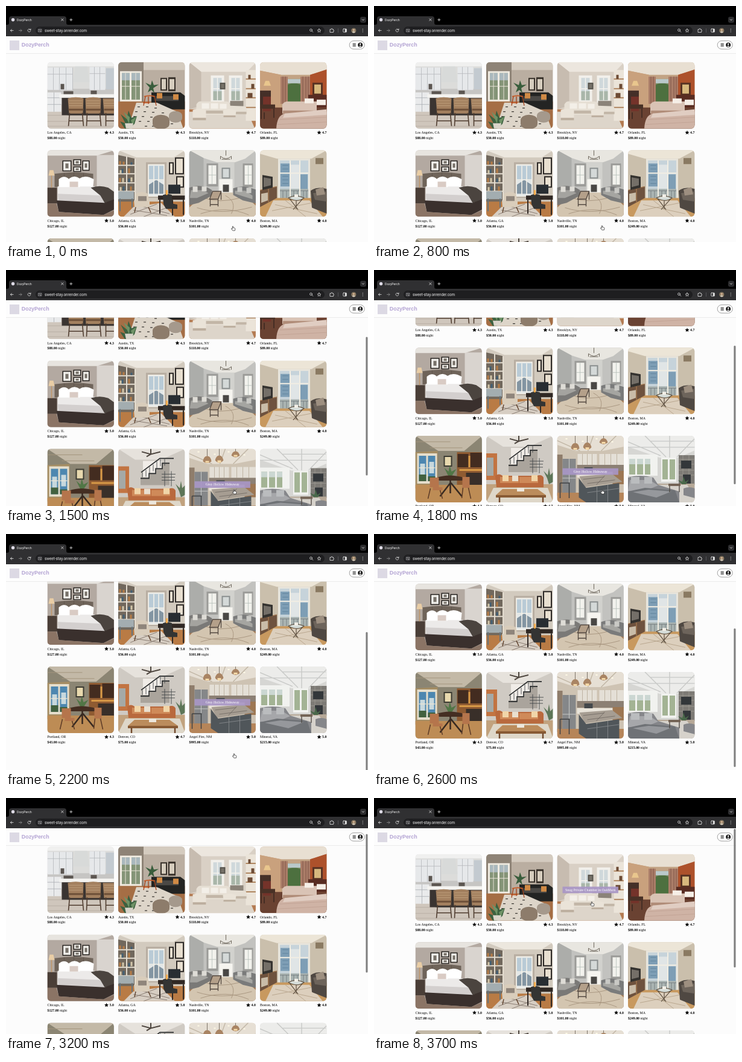
Animation of 600 by 390 pixels, one loop 3800 ms. Source, as an HTML page:

```html
<!DOCTYPE html>
<html lang="en">
<head>
<meta charset="utf-8">
<title>DozyPerch</title>
<style>
  html, body { margin: 0; width: 100%; height: 100%; overflow: hidden; background: #fcfcfc; }
  svg { display: block; }
  text { white-space: pre; }
  .ui { font-family: Roboto, Inter, sans-serif; fill: #ececec; }
  .caption { font: 5.87px "Liberation Serif", "Times New Roman", serif; fill: #000; }
  .bold { font-weight: 700; }
  .brand { font: 700 8.9px "Liberation Sans", Arial, sans-serif; fill: #b3a3d3; }
  .icon { fill: none; stroke: #d6d6d6; stroke-width: .9; stroke-linecap: round; stroke-linejoin: round; }
</style>
</head>
<body>
<svg width="600" height="390" viewBox="0 0 600 390">
  <defs>
    <clipPath id="photo"><rect width="110.4" height="110" rx="6"/></clipPath>
    <clipPath id="page"><rect y="78" width="600" height="312"/></clipPath>
    <path id="star" d="M0-3.5 1-1.1 3.5-1 1.6.6 2.2 3.1 0 1.7-2.2 3.1-1.6.6-3.5-1-1-1.1z"/>
  </defs>

  <rect width="600" height="390" fill="#fcfcfc"/>
  <g clip-path="url(#page)"><g id="grid"></g></g>

  <!-- site header -->
  <path fill="#fdfdfd" d="M0 50h600v28H0z"/>
  <path fill="#e6e6e6" d="M0 78h600v.8H0z"/>
  <rect x="6" y="57" width="16" height="16" fill="#dcd9e4"/>
  <text class="brand" x="25.8" y="67.4">DozyPerch</text>
  <rect x="569.2" y="57.6" width="25" height="13.6" rx="6.8" fill="#fff" stroke="#8a8a8a" stroke-width=".8"/>
  <path stroke="#222" stroke-width="1" d="M574.6 62.3h5.2m-5.2 2h5.2m-5.2 2h5.2"/>
  <circle cx="587.2" cy="64.3" r="3.9" fill="#111"/>
  <circle cx="587.2" cy="63.1" r="1.3" fill="#fff"/>
  <path fill="#fff" d="M584.8 66.6q2.4-2.4 4.8 0q-2.4 1.8-4.8 0z"/>

  <!-- browser frame -->
  <path d="M0 0h600v32H0z"/>
  <path fill="#303032" d="M0 31h600v19H0z"/>
  <path fill="#303032" d="M2 31q3 0 3-3v-7q0-4 4-4h87q4 0 4 4v7q0 3 3 3z"/>
  <circle cx="11.6" cy="22.8" r="2.7" fill="#dedbe6"/>
  <text class="ui" x="18" y="24.8" font-size="5.2">DozyPerch</text>
  <path class="icon" d="m91.7 21 3.4 3.4m0-3.4-3.4 3.4M105.8 22.8h4m-2-2v4"/>
  <rect x="587" y="17.8" width="10" height="10" rx="3" fill="#2d2d2f"/>
  <path class="icon" d="m590.2 22 1.7 1.7 1.7-1.7"/>
  <rect x="49" y="34" width="479" height="13" rx="6.5" fill="#1e1e20"/>
  <path class="icon" d="M12 40.5H7.4m2-2-2 2 2 2"/>
  <path class="icon" style="stroke:#858585" d="M21.5 40.5h4.6m-2-2 2 2-2 2"/>
  <path class="icon" d="M40.6 39.2a2.4 2.4 0 1 0 .2 2M41 37.8v1.7h-1.7"/>
  <circle cx="56.2" cy="40.5" r="4.6" fill="#343437"/>
  <path class="icon" d="M53.8 39.2h2m1.6 0h1.2m-4.8 2.7h1m1.6 0h2.2"/>
  <text class="ui" x="64" y="42.7" font-size="6.3">sweet-stay.onrender.com</text>
  <circle class="icon" cx="505.5" cy="39.8" r="1.9"/>
  <path class="icon" d="m507 41.4 1.7 1.7"/>
  <use href="#star" class="icon" transform="translate(519 40.6) scale(.85)"/>
  <path class="icon" d="M537.4 38.6h1.6q0-1.4 1-1.4t1 1.4h1.6v1.5q1 0 1 .9t-1 .9v1.6h-5.2z"/>
  <path stroke="#66666a" stroke-width=".7" d="M550.5 37v7"/>
  <rect class="icon" x="558.8" y="37.8" width="5.6" height="5.4" rx=".6"/>
  <path fill="#e0e0e0" d="M561.8 38h2.5v5h-2.5z"/>
  <circle cx="576.3" cy="40.5" r="4" fill="#8a7a62"/>
  <circle cx="576.3" cy="39.4" r="1.5" fill="#d8b394"/>
  <path fill="#d5cbbb" d="M573.7 43.4q2.6-4 5.2 0q-2.6 2-5.2 0z"/>
  <path stroke="#d6d6d6" stroke-width="1.2" stroke-linecap="round" d="M591.3 38.2v.01m0 2.29v.01m0 2.29v.01"/>

  <rect id="thumb" x="596.4" y="51" width="3" height="229" rx="1.5" fill="#7e7e7e"/>
  <g id="hand">
    <path fill="#fff" stroke="#222" stroke-width=".7" stroke-linejoin="round"
      d="M-1.2-3.2q.7-.8 1.3 0v2.1l2.3.5q1.1.3 1 1.4l-.5 2.8h-3.7l-2.2-2.8q-.2-1 .8-.7l1 .6z"/>
  </g>
</svg>

<script>
// Each room is a stack of shapes: "fill path", or "~colour width path" for lines.
const rooms = [
`#dcdcda M0 0h111v110H0z
#c6c5c3 M0 44h111v16H0z
#f0f0ef M0 0h111v7H0z
#e6e8ea M0 9h42v37H0zM70 8h26v38H70z
~#b4b7ba .8 M10 9v37M20 9v37M31 9v37M42 9v37M78 8v38M87 8v38M0 20h42M70 19h26
#d8dad9 M46 7h20l4 26H43z
#c3cad0 M97 10h14v35H97z
#5c5651 M22 36h6v9h-6zM27 48h16v8H27zM72 47h10v8H72z
#cfc6bc M0 70h111v40H0z
#e9eaeb M0 50h23v32H0z
~#a9adb1 .8 M0 59h23M0 70h23M11 50v32
#3a3431 M24 58h87v30H24z
#f4f3f0 M20 53h91v6H20z
#a3805f M34 60q13-4 26 0l-1 25H36zM63 60q13-4 26 0l-1 25H64zM92 60h19v25H94z
~#c5a582 .8 M36 64h22M36 68h22M36 72h22M65 64h22M65 68h22M65 72h22M94 64h17M94 68h17M94 72h17
#6e5039 M35 77h25v3H35zM64 77h25v3H64zM94 77h17v3H94z
~#4f3c2f 1.6 M37 84l-2 22M58 84l2 22M66 84l-1 22M87 84l2 22M97 84v22M36 97h23M65 97h23M97 97h14
~#a99f96 .6 M0 88h34M0 98h33M0 106h111`,

`#baaea1 M0 0h111v110H0z
#d4cbbf M0 0h111v13H42z
#8e8376 M0 0h42v110H0z
#f0ebe1 M3 15h36v51H3z
#849477 M6 18h13v44H6zM22 18h14v44H22z
#aab8bd M6 18h13v12H6zM22 18h14v12H22z
~#e7e1d6 1 M6 40h30M12 18v44M29 18v44
#373029 M70 26h11v21H70zM83 25h12v23H83z
#d6cdbe M72 28h7v17h-7zM85 28h8v17h-8z
#a56e45 M0 65h111v45H0z
#232423 M55 50h48l8 6v22H70l-15-9z
#4a4845 M62 56h38v8H62z
#d08a45 M64 51h9v9h-9zM91 53h9v9h-9z
#ddd5c9 M30 67h34l34 15 10 28H16z
~#3d3934 1.3 M32 74h4m10 0h4m10 2h4M28 82h4m10 0h4m10 1h4m12 1h4M25 90h4m10 0h4m10 1h4m36 2h4M34 98h4m10 0h4m35 4h4M44 106h4m8 0h4
~#c5602f 2 M43 57q9-3 18 0M41 67h11
~#a24620 1.4 M45 57l-3 15M60 57l3 15M50 57v12
#395d3c M52 42l-7-8 9 4 2-8 3 8 8-1-9 6 2 8-5-5-6 4z
#8d7c6b M57 96a14 9 0 0 1 28 0v6a14 9 0 0 1-28 0z
#a5998c M84 88a11 7 0 0 1 22 0v5a11 7 0 0 1-22 0z
#3c6140 M11 110L3 98l9 3-8-15 10 8 3-14 5 12 9-3-4 13-9 8z
#6f9367 M9 82l10 9-1 11zM21 96l9-6-6 14z
#d9d4ca M11 101h14l-2 9H13z`,

`#d9d0c5 M0 0h111v110H0z
#ece6de M0 0h111l-15 16H20z
#c7bcb0 M0 0l20 16v56L0 78z
#f2f0eb M36 22h22v45H36zM66 22h22v45H66z
#cfd8db M40 26h14v37H40zM70 26h14v37H70z
#a9b6a9 M40 48h14v15H40zM70 48h14v15H70z
~#f5f3ee 1.4 M40 44h14M70 44h14M47 26v37M77 26v37
#55524b M51 34h9v11h-9z
#777269 M53 36h5v7h-5z
#b47b52 M0 78h111v32H0z
#ddd5ca M0 82h97l12 28H0z
#8b8379 M68 64h22v9H68z
#ebe4d9 M94 13h17v84H94z
~#a77950 1.8 M94 28h17M94 44h17M94 59h17M94 75h17
#6d4b35 M98 21h4v7h-4zM103 36h5v8h-5zM97 51h8v8h-8z
#e6dfd4 M12 70q3-6 9-5h41q5 0 6 7l24 1q5 2 4 12l-22 2H12z
#c2b6a7 M14 80h46v5H14zM72 82h23v4H72z
#eae3d8 M6 79q11-4 22 0v17H6zM56 80q10-4 22 0l-1 9H57z
#bcae9e M6 92h22v4H6zM57 88h20v3H57z
#f3efe8 M21 68h12v9H21zM36 68h12v9H36zM51 69h11v8H51z`,

`#c2a384 M0 0h111v110H0z
#e8dfd2 M0 0h111v12L84 21H35L0 14z
#ad512b M83 21l28-9v70H83z
#c9a17d M0 14l35 7v60H0z
#77865e M44 28h25v39H44z
#4d703f M44 39q13-9 25 0v28H44z
#bac9ca M44 28h25v7H44z
#aa7d68 M34 24h12v45H34zM67 24h16v45H67z
~#805748 1 M38 24v45M42 24v45M71 24v45M76 24v45M80 24v45
#6a4232 M0 75h111v35H0z
#442f28 M0 47h18v27H0z
#74332a M5 57h13v24H5z
#493126 M0 70h25v7H0z
~#3d2921 1.6 M2 77v17M23 77v15M7 83v11
#e9c68d M6 39l3-8h6l3 8z
#573223 M87 34h17v21H87z
#d7b87d M90 37h11v15H90z
#582c22 M80 54h31v21H80z
#d9c3b5 M37 70q3-5 9-5h48v20H37z
#b08c78 M38 80h56v6H38z
#f6efe7 M74 60h15v8H74zM94 62h15v9H94z
#cfb3a5 M27 110q1-22 14-25l70-4v29z
#e0cdc2 M41 85l70-7v9L38 92z
~#bd9e90 .7 M33 95l78-4M29 103l82-4`,

`#b3a9a1 M0 0h111v110H0z
#d9d4cf M82 8h29v78H82z
#e7e4df M0 0h111L82 9H0z
#26221f M25 17h15v18H25zM43 15h13v10H43zM43 27h13v9H43zM58 17h12v17H58z
#efede8 M26.5 18.5h12v15h-12zM44.5 16.5h10v7h-10zM44.5 28.5h10v6h-10zM59.5 18.5h9v14h-9z
#777169 M30 22h5v8h-5zM47 18h5v4h-5zM47 30h5v3h-5zM62 22h4v7h-4z
#6f645a M12 39q32-5 64 0v22H12z
~#5c5148 .7 M28 38v22M44 37v24M60 38v22
#4a3e37 M0 62h16v26H0z
#e9cda5 M2 42l2-9h6l2 9z
~#c09565 1.4 M7 42v20
#eceae9 M17 60q29-6 62 0l22 16-5 14H17z
#d3cfce M17 72l76 3 3 12H19z
#fff M19 48q9-8 17 0v13H19zM36 47q9-7 18 0v14H36zM53 47q10-7 24 1l-1 12H53z
#d9cbc4 M37 52h14v9H37z
#4b443f M72 62q15-5 29 0l10 7v15l-16 3-7-12z
#3a302d M15 83l80 4 16-6v17l-18 9-74-5z
#8b7465 M0 88h15l4 14 74 5 18-8v11H0z`,

`#d2cabe M0 0h111v110H0z
#ece7de M0 0h111L92 12H30z
#71685d M0 8l28 6v76H0z
~#e3dccf 2 M28 14v73M0 25h28M0 39h28M0 54h28M0 68h28M14 10v60
~#b67c46 3 M3 18v6m6-5v5M18 30v8M3 46v7M21 60v7
~#415f74 3 M7 31v7m15-18v4M9 60v7m9-20v6
~#d3c7aa 3 M4 33v5m4 8v7m14-8v7M4 61v6
#b8aea2 M46 20h34v59H46z
#e4e8e8 M50 24h26v52H50z
#b9cbd6 M51 26h24v24H51z
#8395a2 M51 57l12-8 12 8v15H51z
~#f4f1e9 1.6 M50 24h26v52H50zM51 49h24M59 26v48M67 26v48
#2b2725 M84 20h8v20h-8zM94 12h15v28H94zM96 43h13v19H96z
#e8dfd0 M86 22h4v16h-4zM96 14h11v24H96zM98 45h9v15h-9z
#b97b45 M0 85h111v25H0z
#d7cec3 M25 94l46-7 23 23H9z
~#77695f .8 M25 99l56 9M40 93l45 12M20 106l44-17M42 110l36-14
#a3adb0 M0 68h26v13H0z
~#66747c 2 M3 80v21M23 80v15
#d9cdbb M29 72q10-6 20 0l3 13H29zM26 83h26v11H27z
#8f857b M33 76h14v8H33z
~#61442f 1.5 M29 94l-2 9M50 94l4 9
#282d32 M83 57h20v15H83z
#302824 M66 75h45v7H66z
~#302824 2 M69 82v23M90 82v26M108 82v25
#343433 M74 74q9-3 15 0v14l9 2v7H79l-4-8z
#f3ab4b M79 66h3v8h-3z`,

`#c2c2bf M0 0h111v110H0z
#e8e6e0 M0 0h111L93 14 76 20H46L24 13z
#acadaa M0 0l24 13v57L0 80z
#d2d2ce M48 20h27v50H48z
#9b9b98 M29 22h19v38H29zM89 22h17v39H89z
#f2f2ed M32 25h13v31H32zM92 25h12v32H92z
~#b4bdb8 .8 M38 25v31M32 41h13M98 25v32M92 41h12
#f5f4ef M50 48h22v24H50z
#494744 M56 57h10v12H56z
#8a8f8f M54 29h14v18H54z
#d4d9d8 M56 31h10v14H56z
~#6c655a 1 M61 0v9M52 10q9 8 18 0M54 15h14M52 10v5m18-5v5
#a77c57 M0 75h111v35H0z
#d3c5b0 M27 70h60l24 22v18H0V95z
~#aa9882 1 M25 79q25 9 59 0M13 95q40 13 91-1M19 105q43-14 80 2M60 75q20 10 10 30
#7a7977 M0 62q16-6 31 0l7 4v9L16 87 0 91z
#a4a39f M3 66h20l9 5-19 8H1z
#dedcd6 M6 60h8v9H6zM21 60h8v8h-8z
#7a7b7b M73 63q16-6 31 0l7 2v23l-22-5-16-9z
#a5a5a1 M76 67h17l12 8v6l-29-9z
#c9c9c5 M80 61h8v8h-8zM95 62h8v9h-8z
#b4a08a M39 68h14l-5 13H34z
~#554a42 1.4 M39 68h14l-5 13H34zM35 81v12M48 81v12M35 90h13M53 68v14`,

`#cabfac M0 0h111v110H0z
#ece5d7 M0 0h111L85 14H28L0 6z
#e8e5dc M30 14h53v68H30z
#c6d3da M33 17h47v62H33z
#7e9eb5 M34 22h15v38H34zM67 40h12v25H67z
#e0e5e6 M51 24h14v40H51z
#aab4b2 M33 64h47v16H33z
~#6c7476 .8 M33 67h47M38 67v12M44 67v12M56 67v12M62 67v12M72 67v12M77 67v12
~#f2eee3 2 M50 17v63M66 17v63M33 38h47
~#5b7e99 .8 M37 25h10M37 31h10M37 43h10M37 49h10M37 55h10
#c8995f M0 79h111v31H0z
#dccfbd M22 83h60l22 27H9z
~#b9a78f 1 M25 90l70 15M20 100l66-13M42 83l34 27
#6e523e M0 66l28-6v19L0 94z
#c9bca8 M2 72l11-2v13L2 87z
~#a57a52 1.3 M0 66l28-6M14 63v23
#34322f M4 41l17 3v18L4 66z
#746f68 M6 45l12 2v11L6 61z
#8a7a62 M92 13h13v10H92z
#4f4842 M84 67q9-8 27-3v41L86 95z
#6d645b M88 71l23-3v17L91 82z
#9d8f80 M92 65l13-4 3 12-14 2z
#d5dcd8 M47 79q12-7 26 0-11 8-26 0z
~#5f5141 1.2 M47 79q12-7 26 0-11 8-26 0zM49 80l14 18M71 80L55 98M60 83v14
#f2efe7 M57 73h6v5h-6z`,

`#8b8573 M0 0h111v110H0z
#c3b9a7 M0 0h111L81 25H38z
~#a3947d 1 M0 10h58M24 20h54
#a58d63 M0 27l37-2v62H0z
#e5decc M3 29h33v50H3z
#4d87b0 M6 33h12v42H6zM21 33h12v42H21z
#c7d8dd M8 46h8v20H8zM23 43h8v19h-8z
#42613f M6 64h12v11H6zM21 67h12v8H21z
~#eee7d6 1.2 M6 53h12M21 53h12
#8f5b32 M69 27h42v56H69z
#432c20 M70 30h18v22H70zM91 28h20v24H91z
#d79947 M73 55h38v3H73zM88 33h3v19h-3z
#392f29 M84 61h27v22H84z
#bd8c55 M0 81h111v29H0z
#3c3b32 M47 33h14v18H47z
#e8d9ae M49 35h10v14H49z
#517646 M55 67l-7-14 7 6 2-10 3 10 8-4-8 12z
#442e22 M36 69q20-7 44 0l-2 5H39z
~#382a21 2.5 M58 73v22M58 78l-17 22M59 78l18 22
#b5754c M24 69h15v16H24zM78 68h12v18H78zM29 85h16v5H29z
~#5e3c27 1.6 M25 87l-4 17M41 90l4 14M79 86l-2 17M88 86l4 18`,

`#cfcac3 M0 0h111v110H0z
#e6e2dc M0 0h111L71 18H28z
#c27442 M0 29h18v44H0z
#a5a9a6 M1 36h11v30H1z
~#4c443d 2 M39 5l15 4 16-4M54 0v9l-7 4
#f0ece7 M41 20h31v30H41z
#aaa49c M37 47h14v-7h11v-8h11v-9h12v37H37z
~#292b2c 1.6 M37 49h14v-8h11v-8h11v-9h12M38 39l31-23h23
~#45494a .9 M40 39v8m6-12v11m6-16v11m6-15v11m6-17v14m6-17v12m7-12v11M72 42h23M72 47h22M72 52h22M77 37v25M88 37v25
#c1a27e M0 80h111v30H0z
#b9693d M15 66q6-5 12 0h57q8-3 11 3v16H17z
#cf8a59 M23 68h31v10H23zM55 68h31v10H55z
#f1d5a8 M27 65h10v10H27zM75 65h10v10H75z
#eadfce M43 66h10v9H43z
#ded7c9 M12 86h90l9 24H0z
#bb8c5c M27 88h58l14 10H16z
#885a34 M16 98h83v4H16z
~#724a2d 2.5 M22 101v9M94 101v9
#5d7658 M101 70l-6-12 7 7 2-12 2 12 5-5v16l-7 4z
#ede7dc M51 86h12v6H51z`,

`#cec3b3 M0 0h111v110H0z
#e6dfd4 M0 0h111v18L75 25H31L0 15z
~#c1b6a5 1.4 M0 8l38 17M60 0l-9 25M98 0L73 25
~#fff9e6 2 M14 5h3m24 4h3m20-4h3m23 5h3m-50 9h3
#8f7d6b M0 31h9v68H0z
#858789 M9 38h22v58H9z
~#c7c9c8 1 M20 38v58M9 70h22
#e4dfd6 M34 30h32v18H34zM70 30h41v18H70z
~#b4a795 .8 M42 30v18M50 30v18M58 30v18M79 30v18M89 30v18M99 30v18
#8c8074 M33 48h78v11H33z
#44484b M45 52h14v17H45z
#b68559 M0 94h111v16H0z
#e9e4da M33 60h78v9H33z
#9d7753 M92 58h19v22H92z
#a69d92 M37 67l54-4 17 13-62 9z
~#6d6660 .8 M43 72l35-4M50 79l46-6M65 81l14-15
#50565a M36 70l12 16v24l-12-8zM48 86l55-8v32H48z
~#818588 1 M66 84v26M84 81v29M50 94l53-7
~#625a50 .8 M30 0v13M50 0v13M77 0v7
#a98463 M23 21q1-9 7-9t7 9q-7 5-14 0zM43 19q2-8 7-8t7 8q-7 8-14 0zM70 11q2-7 7-7t7 7q-7 6-14 0z
#f5d9a8 M27 20h6v3h-6zM47 19h6v4h-6zM74 10h6v3h-6z
~#3f4244 1.5 M5 78h16M5 78v25M20 78v25`,

`#d6d6d3 M0 0h111v110H0z
#ececea M0 0h111v24L84 36H52L0 18z
~#c8c9c7 1.4 M0 10l54 23M28 0l35 35M69 0v36M110 5L81 35M0 19h111M37 9h72
#f1f2ef M0 31h49v35H0zM55 36h25v40H55z
#a3b394 M2 38h10v26H2zM15 38h10v26H15zM28 38h9v26h-9zM57 39h9v33h-9zM69 39h9v33h-9z
#cbd7d2 M2 38h10v9H2zM15 38h10v9H15zM28 38h9v9h-9z
#7d7a75 M84 32h27v49H84z
~#a09d96 .8 M84 39h27M84 47h27M84 57h27M84 65h27M91 32v48M101 32v49
#33373a M88 41h17v13H88zM91 64h13v15H91z
#b6a897 M0 79h111v31H0z
#d6d2cb M41 81h57l13 19v10H30z
#85868a M0 69q20-6 42 0l8 12 35 11v18H0z
#a6a7aa M3 73h33l14 9-22 9H0z
#6f7276 M0 92l28-6 50 4 7 20H0z
#96989c M8 93l26-4 38 3-25 10z
#babcbe M5 68h14v11H5zM27 68h13v11H27z
#746456 M67 79h20v4H67z
~#514b45 1.4 M69 83v10M85 83v10
#49684a M89 80l-6-7 7 3 2-9 3 9 6-4-5 8z
#85868a M92 87q9-4 19 0v16l-19-5z`
];

const stays = [
  ["Los Angeles, CA", "4.3", "88"], ["Austin, TX", "4.3", "50"],
  ["Brooklyn, NY", "4.7", "118"], ["Orlando, FL", "4.7", "89"],
  ["Chicago, IL", "5.0", "127"], ["Atlanta, GA", "5.0", "56"],
  ["Nashville, TN", "4.0", "101"], ["Boston, MA", "4.0", "249"],
  ["Portland, OR", "4.3", "43"], ["Denver, CO", "4.7", "75"],
  ["Angel Fire, NM", "5.0", "995"], ["Mineral, VA", "5.0", "215"]
];

const $ = id => document.getElementById(id);

const shape = line => {
  const [, tilde, color, width, d] = line.match(/^(~?)(#\w+) (?:([\d.]+) )?(.*)$/);
  return tilde
    ? `<path fill="none" stroke="${color}" stroke-width="${width}" d="${d}"/>`
    : `<path fill="${color}" d="${d}"/>`;
};

const label = (id, title) => `<g id="${id}" visibility="hidden">
  <rect x="9" y="53.8" width="92.4" height="10.8" fill="#a996c6" opacity=".92"/>
  <text class="caption" x="55.2" y="61" text-anchor="middle" style="fill:#fff">${title}</text></g>`;

const labels = {
  2: label("cozy", "Snug Private Chamber in OakMurn"),
  10: label("escape", "Grey Hollow Hideaway")
};

$("grid").innerHTML = stays.map(([city, rating, price], i) => {
  const x = 68.5 + i % 4 * 117.5, y = 92.7 + Math.floor(i / 4) * 145.6;
  return `<g transform="translate(${x} ${y})">
    <g clip-path="url(#photo)">${rooms[i].split("\n").map(shape).join("")}</g>
    ${labels[i] || ""}
    <text class="caption" y="118.6">${city}</text>
    <use href="#star" x="98" y="116.4"/>
    <text class="caption bold" x="110.4" y="118.6" text-anchor="end">${rating}</text>
    <text class="caption" y="127.3"><tspan class="bold">$${price}.00</tspan> night</text></g>`;
}).join("");

// Steps are [ms, value...]; values run straight between them.
const scrollSteps = [[800, 0], [900, 6], [1000, 20], [1200, 58], [1400, 82], [1600, 95], [1800, 110],
  [2000, 145], [2200, 165], [2500, 165], [2600, 156], [2700, 132], [2900, 66], [3100, 22], [3300, 3], [3400, 0]];
const handSteps = [[0, 376.5, 367.5], [300, 378.5, 366.5], [3400, 378.5, 366.5],
  [3500, 369, 222], [3600, 363, 181], [3700, 361.5, 175]];

const at = (steps, t, k = 1) => {
  const n = steps.findIndex(s => s[0] > t);
  if (n < 1) return (n ? steps[steps.length - 1] : steps[0])[k];
  const a = steps[n - 1], b = steps[n];
  return a[k] + (b[k] - a[k]) * (t - a[0]) / (b[0] - a[0]);
};
const show = (id, on) => $(id).setAttribute("visibility", on ? "visible" : "hidden");

const LOOP = 3800, STEP = 100, VIEW = 340, PAGE = 505;
const start = performance.now();

function draw() {
  const t = Math.floor((performance.now() - start) % LOOP / STEP) * STEP;
  const within = (from, to) => t >= from && t < to;
  const y = at(scrollSteps, t);
  $("grid").setAttribute("transform", `translate(0 ${-y})`);
  $("thumb").setAttribute("y", 51 + y * VIEW / PAGE);
  $("hand").setAttribute("transform", `translate(${at(handSteps, t)} ${at(handSteps, t, 2)})`);
  show("hand", !within(1000, 1500) && !within(2600, 3400));
  show("thumb", t >= 900);
  show("escape", within(1500, 2300));
  show("cozy", t >= 3600);
  requestAnimationFrame(draw);
}
draw();
</script>
</body>
</html>
```
